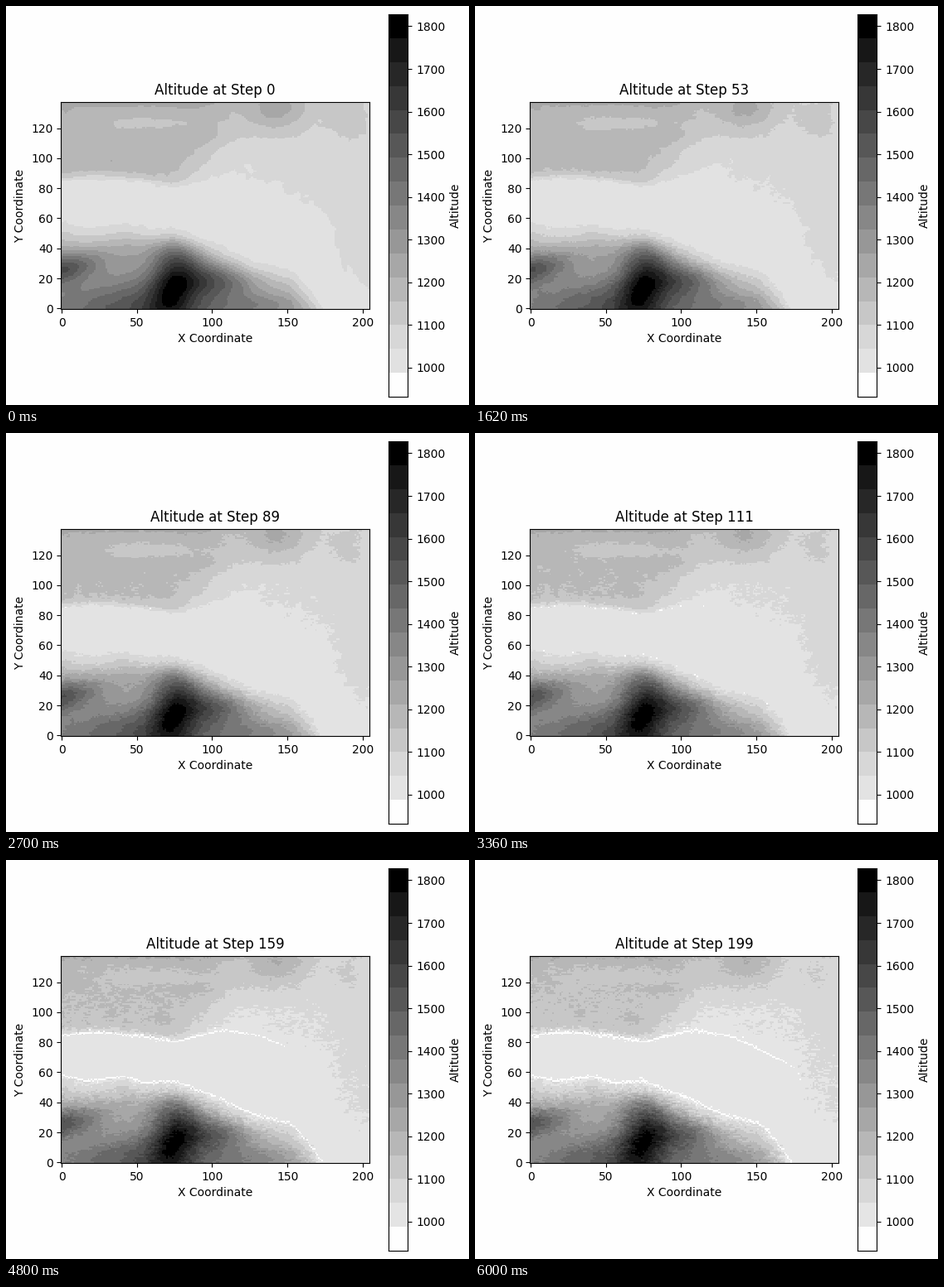
Animation of 558x482 px, one loop 6060 ms. Source, as a matplotlib script:

```python
import numpy as np
import matplotlib.pyplot as plt
from matplotlib.animation import FuncAnimation
from matplotlib.colors import ListedColormap

W, H, DPI = 558, 482, 100
NX, NY = 205, 138
LOW, HIGH, BANDS = 932, 1828, 16
FRAMES, INTERVAL, LAST_STEP = 101, 60, 199

rng = np.random.default_rng(12)
y, x = np.mgrid[:NY, :NX].astype(float)
cols = np.arange(NX)


def smooth_line(*points):
    """Rounded polyline, sampled once per column."""
    px, py = zip(*points)
    line = np.pad(np.interp(cols, px, py), 3, mode="edge")
    return np.convolve(line, np.ones(7) / 7, mode="valid")


def blur(a, times):
    for _ in range(times):
        for axis in (0, 1):
            a = (np.roll(a, 1, axis) + 2 * a + np.roll(a, -1, axis)) / 4
    return a / a.std()


def hill(cx, cy, rx, ry, top, angle=0):
    c, s = np.cos(np.radians(angle)), np.sin(np.radians(angle))
    u = (x - cx) * c + (y - cy) * s
    v = (y - cy) * c - (x - cx) * s
    return top * np.exp(-(u / rx) ** 2 - (v / ry) ** 2)


def sigmoid(v):
    return 1 / (1 + np.exp(-v))


def rise(d, reach, power):
    """Climb from 0 to 1 with the distance beyond a slope's foot."""
    return 1 - np.exp(-(np.maximum(d, 0) / reach) ** power)


def valley_edge(d):
    return 20 * np.exp(np.minimum(d, 0) / 6)


# Feet of the northern and southern slopes; the valley lies between them
north_foot = smooth_line((0, 84), (22, 86.5), (52, 84), (75, 80), (108, 88),
                         (135, 83), (178, 62), (185, 28), (204, 8))
south_foot = smooth_line((0, 58), (16, 54), (42, 57), (56, 53), (75, 54),
                         (104, 43), (129, 31), (153, 26), (169, 7), (204, -50))


def make_terrain():
    north, south = y - north_foot, south_foot - y
    h = 1022 + valley_edge(north) + valley_edge(south)

    # Northern plateau with a dip across it and a raised rim
    plateau = sigmoid((91 + 0.8 * (np.minimum(y, 113) - 94) - x) / 7)
    h += 35 * rise(north, 40, 1) + 120 * plateau * rise(north, 3, 1.5)
    h -= 45 * plateau * sigmoid((x - 33) / 4) * np.exp(-((y - 123) / 5) ** 2)
    h += 55 * sigmoid((122 - x) / 5) * np.exp(-((NY - y) / 5) ** 2)
    h += hill(143, 134, 22, 17, 165) + hill(190, 126, 16, 20, 45)
    h += hill(33, 98, 3, 2.5, 40) + hill(67, 95, 6, 3, 40)
    h += hill(3, 131, 5, 6, 25) + hill(105, 124, 28, 12, 45)

    # Southern mountain: an apron carrying several ridges
    ridges = (hill(0, 26, 28, 10, 300, 15) + hill(60, 0, 60, 18, 260)
              + hill(74, 14, 26, 15, 300, 75) + hill(97, 19, 32, 11, 250)
              + hill(75, 36, 26, 12, 170, -10) + hill(135, 3, 22, 6, 80))
    h += 260 * rise(south, 22, 1.2) + ridges * rise(south, 9, 1.5)

    h += 2.2 * blur(rng.standard_normal(h.shape), 3)
    return h + 2 * blur(rng.standard_normal(h.shape), 14)


def carve(start, foot, end, delay, spread, jitter):
    """Mark the step at which each channel cell opens."""
    rows = np.rint(foot + jitter * rng.standard_normal(NX)).astype(int)
    opens = delay + spread * rng.standard_normal(NX)
    c = cols[:end]
    r = np.clip(rows[:end], 0, NY - 1)
    start[r, c] = np.minimum(start[r, c], opens[:end])


def make_channels():
    start = np.full((NY, NX), np.inf)
    north_delay = 118 + 40 * (cols / 140) ** 3
    for late, spread, jitter in ((0, 16, 0.35), (65, 28, 1)):
        carve(start, north_foot, 180, north_delay + late, spread, jitter)
        carve(start, south_foot, 174, 136 + late, spread, jitter)
    return start


terrain = make_terrain()
channels = make_channels()
slope = np.hypot(*np.gradient(terrain))
grain = rng.standard_normal((NY, NX))
grain = sum(np.roll(grain, k, 1) for k in range(3)) / 3 ** 0.5
rough = np.clip(grain, -2, 2) * np.clip(3.5 + slope, 0, 26)
loss = np.clip(12 + 0.08 * (terrain - 1000), 10, 28)


def heights(step):
    p = step / LAST_STEP
    h = terrain - loss * p + rough * p ** 0.75
    return np.where(step >= channels, 960, np.maximum(h, 992))


def palette(step):
    grays = 7 + 16 * np.arange(BANDS)[::-1]
    grays[0], grays[1], grays[-1] = 254, round(225 + 4 * step / LAST_STEP), 0
    return ListedColormap(np.repeat(grays[:, None] / 255, 3, axis=1))


def box(left, top, width, height):
    return [left / W, 1 - (top + height) / H, width / W, height / H]


plt.rcParams["font.family"] = "DejaVu Sans"
fig = plt.figure(figsize=(W / DPI, H / DPI), dpi=DPI, facecolor="#fefefe")

ax = fig.add_axes(box(66.1, 115.8, 372, 250.4))
image = ax.imshow(heights(0), cmap=palette(0), vmin=LOW, vmax=HIGH,
                  origin="lower", aspect="auto", interpolation="nearest")
ax.set_xlabel("X Coordinate")
ax.set_ylabel("Y Coordinate")
title = ax.set_title("Altitude at Step 0")

bar_ax = fig.add_axes(box(461.3, 10, 23.1, 462))
bar = bar_ax.imshow(np.arange(BANDS)[:, None], cmap=palette(0), origin="lower",
                    aspect="auto", interpolation="nearest",
                    extent=(0, 1, LOW, HIGH))
bar_ax.set_xticks([])
bar_ax.set_yticks(range(1000, 1801, 100))
bar_ax.yaxis.tick_right()
bar_ax.yaxis.set_label_position("right")
bar_ax.set_ylabel("Altitude")


def update(i):
    step = max(0, 2 * i - 1)
    colors = palette(step)
    image.set_data(heights(step))
    image.set_cmap(colors)
    bar.set_cmap(colors)
    title.set_text(f"Altitude at Step {step}")
    return image, bar, title


anim = FuncAnimation(fig, update, frames=FRAMES, interval=INTERVAL,
                     init_func=lambda: update(0), repeat=True, repeat_delay=0)
plt.show()
```
